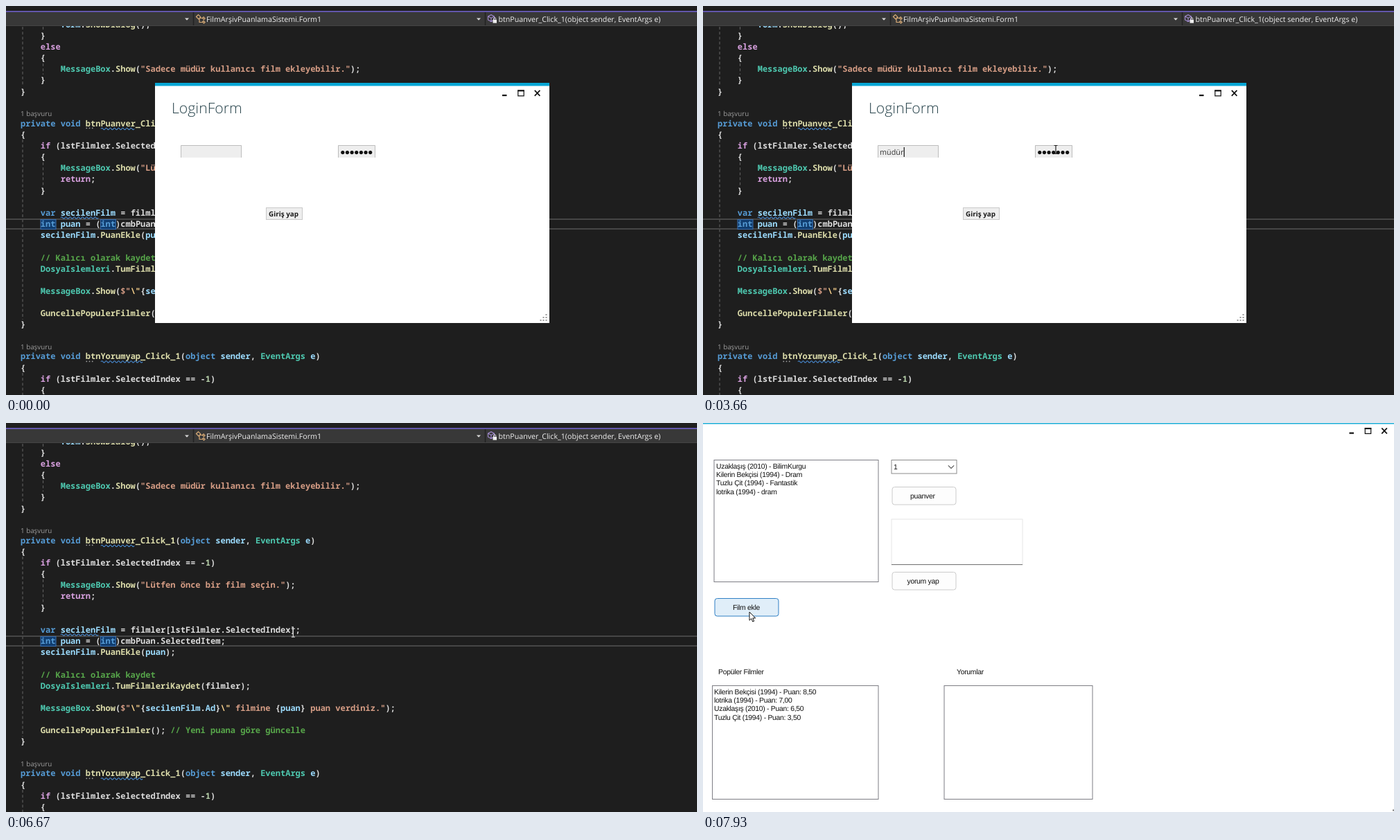
Write an HTML page that moves like this. It is 997 by 562 pixels and loops after 8 s.

```html
<!DOCTYPE html>
<html lang="tr">
<head>
<meta charset="utf-8">
<title>Login</title>
<style>
html, body { margin: 0; width: 100%; height: 100%; overflow: hidden; background: #1e1e1e; }
svg { display: block; width: 997px; height: 562px; }
text { white-space: pre; text-rendering: geometricPrecision; }
.code { font: 600 12.02px "Noto Sans Mono", "DejaVu Sans Mono", monospace; }
.ui { font-family: "Open Sans", "Noto Sans", sans-serif; }
.win { font: 10.4px "Liberation Sans", Arial, sans-serif; letter-spacing: -.28px; fill: #111; }
</style>
</head>
<body>
<svg id="stage" viewBox="0 0 997 562"></svg>
<script>
const LOOP = 8000, TICK = 1000 / 15, COL = 7.21, ROW = 16.15, LEFT = 21;
const stage = document.getElementById('stage');

function add(parent, tag, attrs = {}, text) {
  const el = document.createElementNS('http://www.w3.org/2000/svg', tag);
  for (const key in attrs) el.setAttribute(key, attrs[key]);
  if (text !== undefined) el.textContent = text;
  parent.appendChild(el);
  return el;
}
const rect = (p, x, y, width, height, fill, more) => add(p, 'rect', { x, y, width, height, fill, ...more });
const line = (p, d, stroke, width = 1, more) =>
  add(p, 'path', { d, stroke, 'stroke-width': width, fill: 'none', ...more });
const label = (p, x, y, text, cls, more) => add(p, 'text', { x, y, class: cls, ...more }, text);
const show = (el, on) => el.setAttribute('visibility', on ? 'inherit' : 'hidden');
const move = (el, x, y) => el.setAttribute('transform', `translate(${x} ${y})`);

// ---- code editor ----
const editor = add(stage, 'g');
const RULES = [
  [/^\/\/.*/, '#57a64a'],
  [/^(private|void|object|int|var)\b/, '#569cd6'],
  [/^(if|else|return)\b/, '#d8a0df'],
  [/^(MessageBox|EventArgs|DosyaIslemleri)\b/, '#4ec9b0'],
  [/^(sender|e|puan|secilenFilm|form|Ad)\b/, '#9cdcfe'],
  [/^\w+(?=\()/, '#dcdcaa'],
  [/^\d+/, '#b5cea8'],
  [/^\w+/, '#dcdcdc'],
  [/^\W/, '#dcdcdc']
];
const QUOTED = /^\$?"(?:\\.|[^"\\])*"/;

function paint(text, src) {
  while (src) {
    const quoted = src.match(QUOTED);
    let piece;
    if (quoted) {
      piece = quoted[0];
      for (const part of piece.split(/(\{.*?\}|\\")/)) {
        if (part[0] === '{') paint(text, part);
        else add(text, 'tspan', { fill: part[0] === '\\' ? '#ffd68f' : '#d69d85' }, part);
      }
    } else {
      const [rule, fill] = RULES.find(r => r[0].test(src));
      piece = src.match(rule)[0];
      add(text, 'tspan', { fill }, piece);
    }
    src = src.slice(piece.length);
  }
}

function block(y, lines) {
  lines.forEach((src, i) => {
    const body = src.trimStart(), indent = src.length - body.length;
    paint(label(editor, LEFT + indent * COL, y + i * ROW, '', 'code'), body);
  });
}
const squiggle = (x1, x2, y) => {
  let d = `M${x1} ${y}`;
  for (let x = x1; x < x2; x += 6) d += 'q1.5 -2.6 3 0t3 0';
  line(editor, d, '#4a90dc', 1.1);
};
const guide = (x, y1, y2) => line(editor, `M${x} ${y1}V${y2}`, '#5c5c5c', 1.2, { 'stroke-dasharray': '4 3.2' });

rect(editor, 0, 0, 997, 562, '#1e1e1e');
[[24, 30, 116], [53.5, 30, 36], [53.5, 83, 99], [24, 193, 453], [53.5, 226, 259], [24, 530, 562]]
  .forEach(g => guide(...g));
line(editor, 'M0 308H997M0 322H997', '#464646', 1.8);
[[50, 22], [136.5, 22]].forEach(([x, w]) =>
  rect(editor, x, 308.5, w, 14, '#113d6f', { stroke: '#3a6eae' }));

block(30.7, [
  '        form.ShowDialog();', '    }', '    else', '    {',
  '        MessageBox.Show("Sadece müdür kullanıcı film ekleyebilir.");', '    }', '}'
]);
block(173.7, [
  'private void btnPuanver_Click_1(object sender, EventArgs e)', '{',
  '    if (lstFilmler.SelectedIndex == -1)', '    {',
  '        MessageBox.Show("Lütfen önce bir film seçin.");', '        return;', '    }', '',
  '    var secilenFilm = filmler[lstFilmler.SelectedIndex];',
  '    int puan = (int)cmbPuan.SelectedItem;',
  '    secilenFilm.PuanEkle(puan);', '',
  '    // Kalıcı olarak kaydet',
  '    DosyaIslemleri.TumFilmleriKaydet(filmler);', '',
  '    MessageBox.Show($"\\"{secilenFilm.Ad}\\" filmine {puan} puan verdiniz.");', '',
  '    GuncellePopulerFilmler(); // Yeni puana göre güncelle', '}'
]);
block(510.4, [
  'private void btnYorumyap_Click_1(object sender, EventArgs e)', '{',
  '    if (lstFilmler.SelectedIndex == -1)', '    {'
]);
squiggle(137, 185, 177.5);
squiggle(79, 128, 306);
squiggle(137, 192, 514);
for (const y of [176.5, 513.5])
  line(editor, `M115.5 ${y}H126`, '#a8a8a8', 1.6, { 'stroke-dasharray': '1.6 2.6' });
for (const y of [158.5, 495.5])
  label(editor, LEFT, y, '1 başvuru', 'ui', { 'font-size': 9.8, fill: '#9c9c9c' });

// navigation bar
rect(editor, 0, 0, 997, 29, '#1f1f1f');
rect(editor, 0, 7, 997, 1.8, '#6a5dbb');
rect(editor, 0, 9, 997, 19, '#383838');
line(editor, 'M0 28.5H997', '#454545');
line(editor, 'M270.5 9V28M691.5 9V28', '#222', 1.5);
for (const x of [261, 682]) add(editor, 'path', { d: `M${x - 3} 17.5h6l-3 3.2z`, fill: '#d8d8d8' });
const bar = { 'font-size': 10.66, fill: '#f0f0f0' };
label(editor, 289, 22.6, 'FilmArşivPuanlamaSistemi.Form1', 'ui', bar);
label(editor, 710.5, 22.6, 'btnPuanver_Click_1(object sender, EventArgs e)', 'ui', bar);
line(editor, 'M274.5 15.5l3-3 3.4 3.4-3 3zM280 17.5h3M279 18v5.5h4M283.5 17.5l1.6-1.6 2 2-1.6 1.6zM283.5 23l1.6-1.6 2 2-1.6 1.6z', '#dcae78', 1.2);
line(editor, 'M695.5 15l4.5-2.3 4.5 2.3v5l-4.5 2.6-4.5-2.6zM695.5 15l4.5 2.4 4.5-2.4M700 17.4v5', '#a28bd0', 1.1);
rect(editor, 702.5, 20, 5.5, 4.6, '#eee');
line(editor, 'M703.7 20v-1.6a1.5 1.5 0 0 1 3 0V20', '#eee', 1);

// ---- shared window buttons ----
function windowButtons(p, x, y) {
  rect(p, x, y + 7, 6.5, 2.2, '#111');
  line(p, `M${x + 22.8} ${y + 1.2}h8.4v7.6h-8.4z`, '#111', 1.2);
  rect(p, x + 22.2, y + .4, 9.6, 2, '#111');
  line(p, `M${x + 46.8} ${y + .8}l7.6 8m0 -8l-7.6 8`, '#111', 1.7);
}

// ---- login dialog ----
const login = add(stage, 'g');
rect(login, 215, 111, 569, 347, '#fff');
rect(login, 215, 111, 569, 4.5, '#07a6d5');
label(login, 239, 154.5, 'LoginForm', 'ui', { 'font-size': 21.2, 'font-weight': 300, fill: '#26424a' });
windowButtons(login, 716, 121);
for (const [x, y] of [[0, 0], [4, 0], [8, 0], [4, -4], [8, -4], [8, -8]])
  rect(login, 770.5 + x, 453 + y, 2, 2, '#9a9a9a');
const field = (x1, x2) => {
  rect(login, x1, 201, x2 - x1, 18, '#eee');
  line(login, `M${x1 + .5} 219V201.5H${x2 - .5}V219`, '#bdbdbd');
};
field(252, 340);
field(479, 533);
const userText = label(login, 255, 215, '', 'ui', { 'font-size': 10.8, fill: '#333' });
const selection = rect(login, 482, 204, 47.5, 14.5, '#0078d7');
const dots = Array.from({ length: 7 }, (_, i) =>
  add(login, 'circle', { cx: 485.8 + 6.65 * i, cy: 211.6, r: 2.6 }));
const caret = rect(login, 0, 204, 1.2, 14, '#111');
const enter = rect(login, 375.5, 291.5, 52, 17, '#eee');
const enterText = label(login, 379, 304, 'Giriş yap', 'ui', { 'font-size': 9.9, 'font-weight': 700 });

// ---- film window ----
const films = add(stage, 'g');
const box = (x, y, w, h, stroke = '#7d7d84') => rect(films, x + .5, y + .5, w, h, '#fff', { stroke });
const button = (x, y, tx, text) => {
  const el = rect(films, x + .5, y + .5, 92, 25.5, '#fdfdfd', { rx: 3.5, stroke: '#cbcbcb' });
  label(films, tx, y + 17, text, 'win');
  return el;
};
const list = (x, y, rows) => rows.forEach((row, i) => label(films, x, y + i * 12.35, row, 'win'));

rect(films, 0, 0, 997, 562, '#fff');
rect(films, 0, 0, 997, 1.5, '#20b0d8');
windowButtons(films, 932.5, 6.5);
rect(films, 995, 558.5, 2, 2, '#777');
box(15.5, 53, 237, 176);
list(19, 65.7, ['Uzaklaşış (2010) - BilimKurgu', 'Kilerin Bekçisi (1994) - Dram',
  'Tuzlu Çit (1994) - Fantastik', 'lotrika (1994) - dram']);
box(271.5, 53, 94, 19.5, '#8b8b8b');
label(films, 275, 66.7, '1', 'win');
line(films, 'M353.8 61.3l4.2 4.2 4.2-4.2', '#555', 1.1);
button(272.5, 92, 299, 'puanver');
box(271.5, 138.5, 189, 66, '#e6e6e6');
line(films, 'M272 204.5H461', '#777', 1.2);
button(272.5, 215, 294.5, 'yorum yap');
const addFilm = button(16.5, 253, 43, 'Film ekle');
label(films, 22, 363.3, 'Popüler Filmler', 'win');
label(films, 366, 363.3, 'Yorumlar', 'win');
box(13, 379, 239.5, 164);
box(347.5, 379, 214, 164);
list(16, 391.7, ['Kilerin Bekçisi (1994) - Puan: 8,50', 'lotrika (1994) - Puan: 7,00',
  'Uzaklaşış (2010) - Puan: 6,50', 'Tuzlu Çit (1994) - Puan: 3,50']);

// ---- mouse ----
const halo = add(stage, 'circle', { r: 11.3, fill: '#d8c81e', opacity: .8 });
const arrow = add(stage, 'path', {
  d: 'M0 0V12.2L2.8 9.6 4.7 14 6.7 13.2 4.8 8.9H8.7Z', fill: '#fff', stroke: '#111', 'stroke-width': 1
});
const beam = line(stage, 'M-2.5 -6H2.5M0 -6V6M-2.5 6H2.5', '#222', 1.2);

// ---- timeline ----
const within = (t, spans) => spans.some(([from, to]) => t >= from && t < to);
const countPast = (t, times) => times.filter(x => t >= x).length;
const inside = ([x, y], x1, y1, x2, y2) => x >= x1 && x < x2 && y >= y1 && y < y2;

const USER = 'müdür';
const userKeys = [1540, 1810, 2140, 2260, 2400];
const passKeys = [4800, 5000, 5270, 5530];
const userCaret = [[940, 1410], [1540, 2930], [3530, 3930]];
const passCaret = [[3930, 4130], [4200, 4660], [4800, 6060]];
const clicks = [[880, 940], [3860, 4130], [4200, 4330], [6540, 6670]];
const pointerOn = [[200, 1540], [2930, 4800], [5930, LOOP + 9]];
// time, x, y
const path = [
  [200, 964, 553], [465, 560, 330], [600, 375, 240], [730, 301, 214.5],
  [1070, 301, 214.5], [1200, 287.5, 214.5],
  [2870, 287.5, 214.5], [3130, 395, 177], [3270, 485, 197], [3390, 530, 219],
  [3460, 530, 219], [3660, 509, 207.5],
  [5870, 509, 207.5], [6060, 440, 250], [6200, 354, 291], [6330, 398, 302], [6400, 413, 303.3],
  [6600, 413, 303.3], [6660, 414, 303.5], [6800, 421.5, 294],
  [7060, 225, 262], [7200, 118, 244], [7320, 72, 241],
  [7460, 70, 258], [7590, 66, 281], [7660, 66, 283], [7800, 66, 283], [7930, 67, 273]
];

function pointerAt(t) {
  const i = path.findIndex(p => p[0] > t);
  if (i === 0) return path[0].slice(1);
  if (i < 0) return path[path.length - 1].slice(1);
  const [a, b] = [path[i - 1], path[i]], s = (t - a[0]) / (b[0] - a[0]);
  return [a[1] + (b[1] - a[1]) * s, a[2] + (b[2] - a[2]) * s];
}

function drawLogin(t, pos) {
  userText.textContent = USER.slice(0, countPast(t, userKeys));
  const typed = countPast(t, passKeys), shown = typed || 7;
  const selected = within(t, [[4200, 4800]]);
  show(selection, selected);
  dots.forEach((dot, i) => {
    show(dot, i < shown);
    dot.setAttribute('fill', selected ? '#fff' : '#111');
  });
  const inUser = within(t, userCaret);
  show(caret, inUser || within(t, passCaret));
  let x = 482.6 + 6.7 * shown;
  if (inUser) x = 255.3 + (userText.textContent ? userText.getComputedTextLength() : 0);
  else if (t < 4200) x = 509;
  caret.setAttribute('x', x);

  const pressed = t >= 6540;
  const hover = t >= 5930 && inside(pos, 375, 291, 428, 309);
  enter.setAttribute('fill', pressed ? '#333' : hover ? '#666' : '#eee');
  enter.setAttribute('stroke', pressed ? '#333' : hover ? '#666' : '#c9c9c9');
  enterText.setAttribute('fill', pressed || hover ? '#f4f4f4' : '#1c1c1c');
}

function draw(t) {
  const pos = pointerAt(Math.floor((t + 9) / TICK) * TICK);
  const dialogOpen = t < 6670, filmsOpen = t >= 6790;
  show(editor, !filmsOpen);
  show(login, dialogOpen);
  show(films, filmsOpen);
  if (dialogOpen) drawLogin(t, pos);

  const hot = filmsOpen && inside(pos, 17, 253, 110, 280);
  addFilm.setAttribute('fill', hot ? '#e0eef9' : '#fdfdfd');
  addFilm.setAttribute('stroke', hot ? '#2f7fc4' : '#cbcbcb');

  const visible = within(t, pointerOn);
  const onField = dialogOpen && (inside(pos, 252, 201, 340, 219) || inside(pos, 479, 201, 533, 219));
  const onCode = !filmsOpen && !(dialogOpen && inside(pos, 215, 111, 784, 458));
  const isBeam = onField || onCode;
  beam.setAttribute('stroke', onCode ? '#d4d4d4' : '#222');
  show(beam, visible && isBeam);
  show(arrow, visible && !isBeam);
  show(halo, within(t, clicks));
  move(beam, ...pos);
  move(arrow, ...pos);
  move(halo, pos[0] - 1, pos[1] - 1);
}

const start = performance.now();
function tick() {
  draw((performance.now() - start) % LOOP + 3);
  requestAnimationFrame(tick);
}
tick();
</script>
</body>
</html>
```
